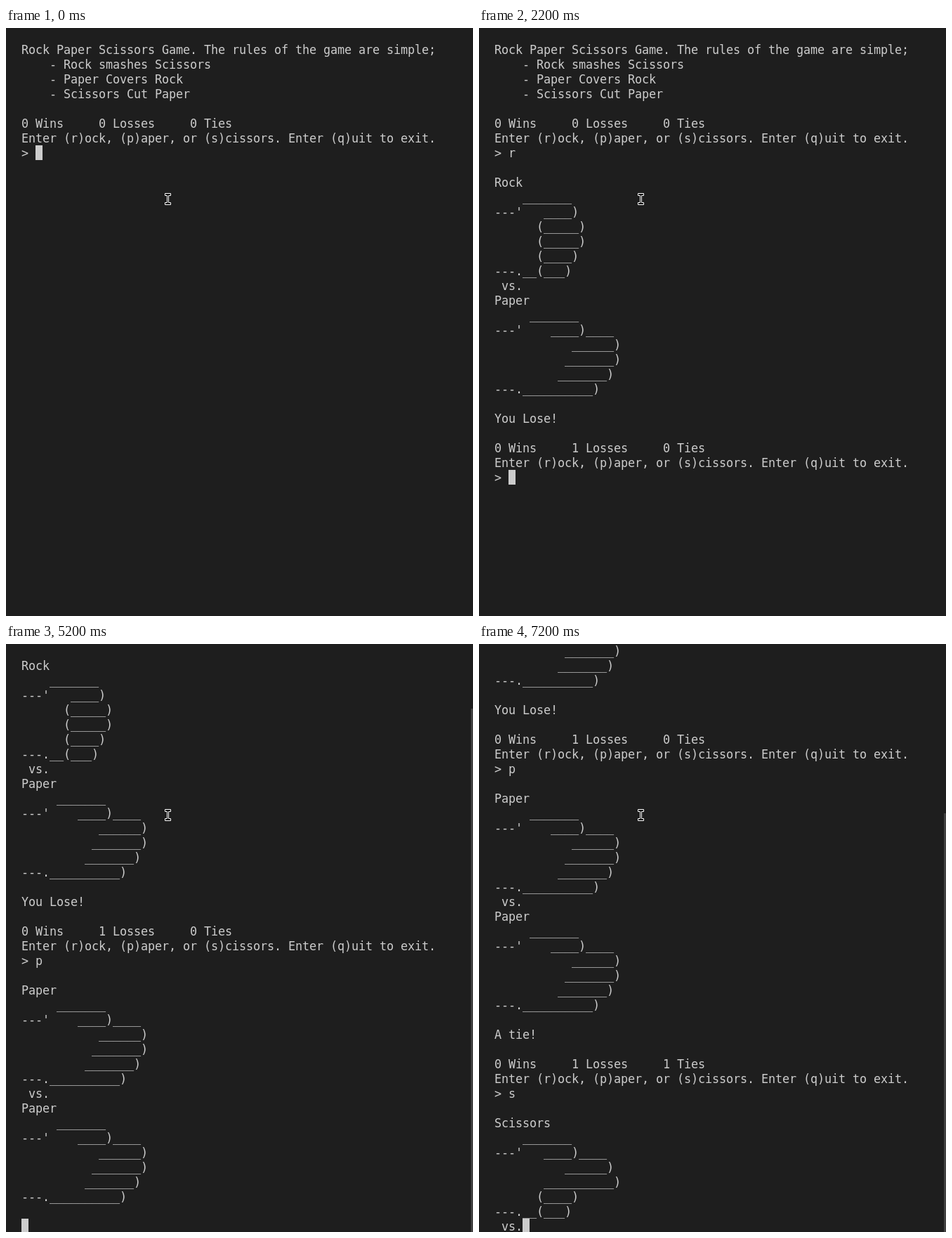
Recreate the animation shown at these times as an HTML page. Size 665 by 837 pixels, loop 8000 ms.

```html
<!DOCTYPE html>
<html lang="en">
<head>
<meta charset="utf-8">
<title>Rock Paper Scissors</title>
<style>
  html, body { margin: 0; width: 100%; height: 100%; overflow: hidden; background: #1e1e1e; }
  svg { display: block; }
  text { font: 16.8px "DejaVu Sans Mono", monospace; fill: #ccc; white-space: pre; }
</style>
</head>
<body>
<svg width="665" height="837" viewBox="0 0 665 837">
  <g id="lines"></g>
  <rect id="cursor" width="10" height="21" fill="#ccc"/>
  <rect id="thumb" x="662" width="3" fill="#424242"/>
  <path d="M226.5 235.5h8v3h-3v10h3v3h-8v-3h3v-10h-3z" fill="#000" stroke="#fff"/>
</svg>
<script>
const LOOP = 8000;
const CELL = 10, ROW = 21, LEFT = 22, TOP = 20, LAST_ROW = 38, BASELINE = 17;

const rock = `Rock
    _______
---'   ____)
      (_____)
      (_____)
      (____)
---.__(___)
`;
const paper = `Paper
     _______
---'    ____)____
           ______)
          _______)
         _______)
---.__________)
`;
const scissors = `Scissors
    _______
---'   ____)____
          ______)
       __________)
      (____)
---.__(___)
`;
const rules = `Rock Paper Scissors Game. The rules of the game are simple;
    - Rock smashes Scissors
    - Paper Covers Rock
    - Scissors Cut Paper

`;
const prompt = (wins, losses, ties) =>
  `${wins} Wins     ${losses} Losses     ${ties} Ties\n` +
  "Enter (r)ock, (p)aper, or (s)cissors. Enter (q)uit to exit.\n> ";
const play = hand => `\n\n${hand} vs.`;
const reply = hand => `\n${hand}\n`;

// Terminal output by time; the cursor follows the last character.
const output = [
  [0, rules + prompt(0, 0, 0)],
  [500, "r"],
  [700, play(rock)],
  [1700, reply(paper)],
  [2200, "You Lose!\n\n" + prompt(0, 1, 0)],
  [3900, "p"],
  [4200, play(paper)],
  [5200, reply(paper)],
  [5700, "A tie!\n\n" + prompt(0, 1, 1)],
  [6900, "s"],
  [7200, play(scissors)],
];

const byId = id => document.getElementById(id);
const setAttrs = (el, attrs) => {
  for (const name in attrs) el.setAttribute(name, attrs[name]);
  return el;
};

function drawLine(line, row) {
  const indent = line.length - line.trimStart().length;
  const chars = line.trim();
  const text = document.createElementNS("http://www.w3.org/2000/svg", "text");
  text.textContent = chars;
  return setAttrs(text, {
    x: [...chars].map((_, i) => LEFT + CELL * (indent + i)).join(" "),
    y: TOP + ROW * row + BASELINE,
  });
}

function draw(count) {
  const lines = output.slice(0, count).map(([, text]) => text).join("").split("\n");
  const lastLine = lines.length - 1;
  const scroll = Math.max(0, lastLine - LAST_ROW);
  const rows = lines.map((line, i) => [line, i - scroll])
    .filter(([line, row]) => line.trim() && row >= -1);
  byId("lines").replaceChildren(...rows.map(([line, row]) => drawLine(line, row)));

  setAttrs(byId("cursor"), {
    x: LEFT + CELL * lines[lastLine].length,
    y: TOP + ROW * (lastLine - scroll),
  });
  const thumbTop = Math.round(900 * scroll / (43.2 + scroll) - 63);
  setAttrs(byId("thumb"), { y: thumbTop, height: scroll ? 837 - thumbTop : 0 });
}

let shown = 0;
function update(now) {
  const time = now % LOOP;
  const count = output.filter(([start]) => start <= time).length;
  if (count !== shown) draw(shown = count);
}

const start = performance.now();
function tick() {
  update(performance.now() - start);
  requestAnimationFrame(tick);
}
tick();
</script>
</body>
</html>
```
